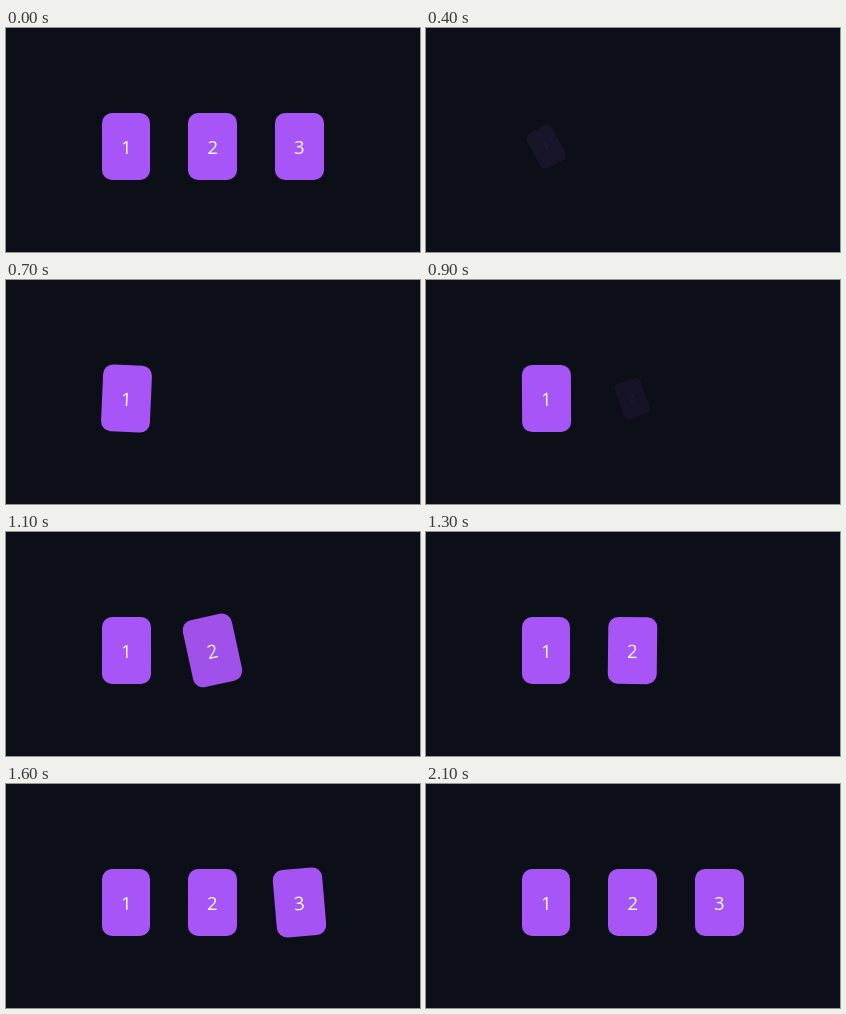
Write an HTML page that moves like this. It is 414 px wide and 224 px high and loops after 2300 ms.

```html
<!DOCTYPE html>
<html lang="en">
<head>
<meta charset="utf-8">
<title>Staggered cards</title>
<style>
  html, body {
    margin: 0;
    width: 100%;
    height: 100%;
    overflow: hidden;
    background: #0c0f17;
  }
  .card {
    position: absolute;
    top: 84.9px;
    width: 48.6px;
    height: 67.2px;
    border-radius: 10px;
    background: #a855f7;
    color: #fff;
    font: 18.5px/67.2px "Open Sans", "Noto Sans", sans-serif;
    text-align: center;
  }
  .card:nth-child(1) { left: 95.9px; }
  .card:nth-child(2) { left: 182.4px; }
  .card:nth-child(3) { left: 269px; }
</style>
</head>
<body>
<div class="card">1</div>
<div class="card">2</div>
<div class="card">3</div>
<script>
  const LOOP = 2300;
  const STEP = 100;
  const RESTART = 400;
  const FADE = 0.3;
  const starts = [372, 877, 1345];
  const cards = document.querySelectorAll('.card');

  // Remaining distance (1 to 0) of an underdamped spring with unit mass.
  function spring(stiffness, damping, t) {
    const decay = damping / 2;
    const freq = Math.sqrt(stiffness - decay * decay);
    return Math.exp(-decay * t) *
      (Math.cos(freq * t) + decay / freq * Math.sin(freq * t));
  }

  const bezier = (a, b, u) =>
    3 * a * u * (1 - u) ** 2 + 3 * b * u * u * (1 - u) + u ** 3;

  function ease(x) {
    if (x >= 1) return 1;
    let lo = 0, hi = 1;
    for (let i = 0; i < 24; i++) {
      const mid = (lo + hi) / 2;
      if (bezier(0.25, 0.35, mid) < x) lo = mid;
      else hi = mid;
    }
    return bezier(0.1, 1, lo);
  }

  function pose(card, t) {
    if (t < 0) {
      card.style.opacity = 0;
      return;
    }
    const angle = 180 * spring(500, 25, t);
    const scale = 1 - 0.5 * spring(550, 30, t);
    card.style.opacity = ease(t / FADE);
    card.style.transform = Math.abs(angle) < 0.02
      ? 'none'
      : `scale(${scale.toFixed(4)}) rotate(${angle.toFixed(3)}deg)`;
  }

  function draw() {
    const now = performance.now() % LOOP;
    const time = Math.floor(now / STEP) * STEP;
    cards.forEach((card, i) =>
      pose(card, time < RESTART ? 10 : (time - starts[i]) / 1000));
    requestAnimationFrame(draw);
  }
  draw();
</script>
</body>
</html>
```
